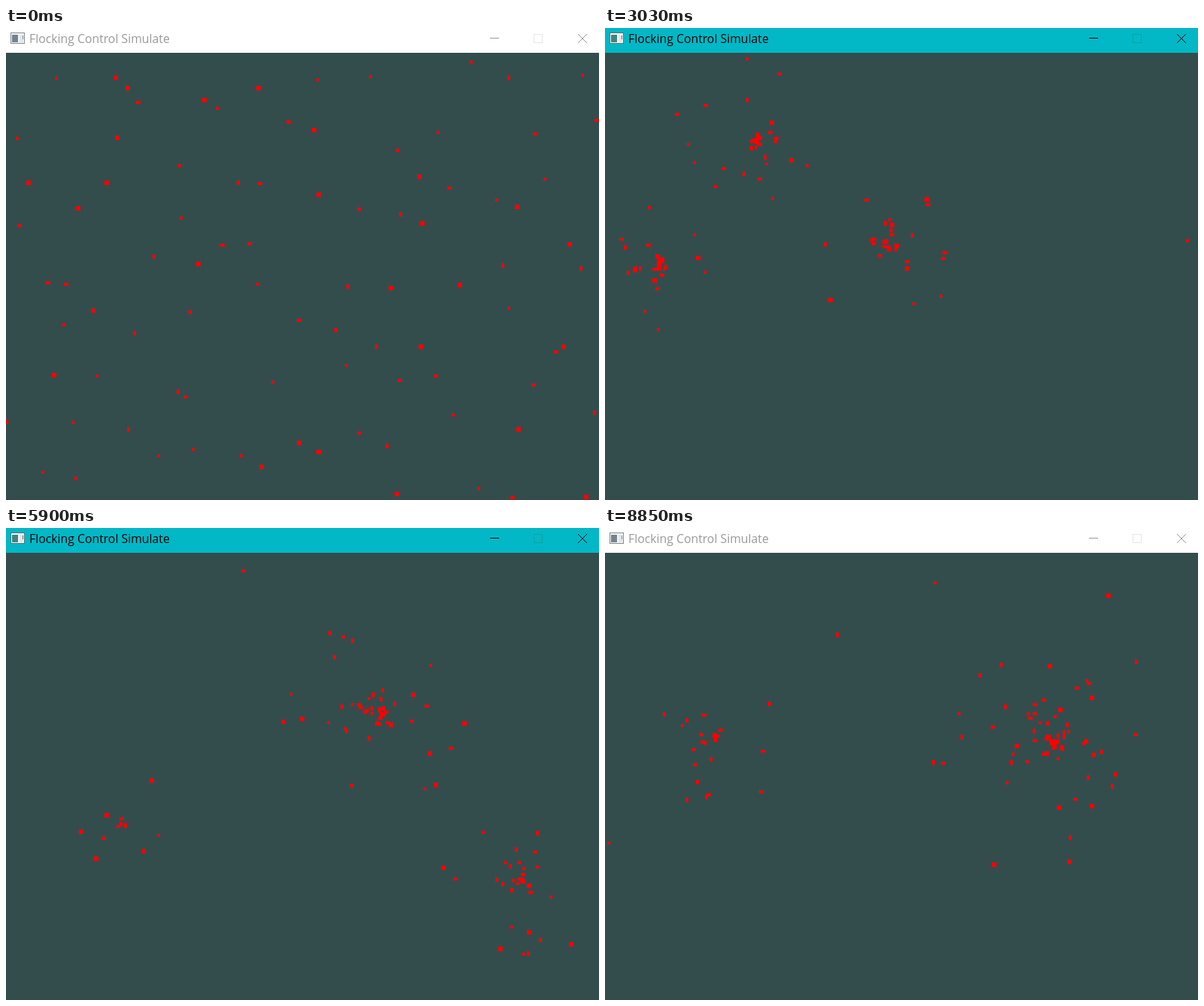
Write an HTML page with a canvas that moves like this. It is 789 px wide and 628 px high and loops after 8.88 s.

```html
<!DOCTYPE html>
<html lang="en">
<head>
<meta charset="utf-8">
<title>Flocking Control Simulate</title>
<style>
  html, body { margin: 0; width: 100%; height: 100%; overflow: hidden; background: #334d4d; }
  canvas, svg { position: absolute; left: 0; top: 0; display: block; }
  svg { --bar: #fff; --ink: #999; --box: #e6e6e6; --pane: #75838f; --edge: #858b91; }
  svg.active { --bar: #02b8c6; --ink: #000; --box: #12a09c; --pane: #3f8580; --edge: #57757a; }
  text { font: 15.8px "Open Sans", "Noto Sans", sans-serif; fill: var(--ink); }
  .line { fill: none; stroke: var(--ink); }
</style>
</head>
<body>
<canvas id="field" width="789" height="628"></canvas>
<svg id="bar" width="789" height="33">
  <rect width="789" height="33" fill="var(--bar)"/>
  <rect x="6.5" y="6.5" width="18" height="14" fill="#f4f6f6" stroke="var(--edge)"/>
  <rect x="8" y="9" width="8" height="10" fill="var(--pane)"/>
  <path d="M18 9h5v10h-5z" fill="#e3e6e6"/>
  <path d="M22.5 10v5" stroke="var(--edge)"/>
  <text x="31" y="20">Flocking Control Simulate</text>
  <path class="line" d="M644 13.5h12"/>
  <rect x="702.5" y="8.5" width="11" height="11" fill="none" stroke="var(--box)"/>
  <path class="line" d="M761 8l12 12m0-12l-12 12"/>
</svg>
<script>
const W = 789, TOP = 33, H = 595, COLS = 10, ROWS = 9;
const LOOP = 8880, STEP = LOOP / 272, FOCUS = [1300, 8600];
const ctx = document.getElementById('field').getContext('2d');
const bar = document.getElementById('bar');

let seed = 41;
function random() {
  seed = (seed + 0x6d2b79f5) | 0;
  let t = Math.imul(seed ^ (seed >>> 15), 1 | seed);
  t = (t + Math.imul(t ^ (t >>> 7), 61 | t)) ^ t;
  return ((t ^ (t >>> 14)) >>> 0) / 4294967296;
}
const mod = (v, n) => ((v % n) + n) % n;
// shortest signed distance on a wrapped axis
const gap = (from, to, size) => mod(to - from + size / 2, size) - size / 2;

// where the flocks are at each moment: x, y, members
const gatherings = [
  { time: 3030, flocks: [[200, 152, 33], [72, 312, 27], [374, 284, 30]] },
  { time: 4590, flocks: [[328, 468, 57], [62, 190, 19], [642, 185, 14]] },
  { time: 5900, flocks: [[500, 252, 45], [685, 470, 33], [150, 395, 12]] },
  { time: 7530, flocks: [[62, 68, 24], [725, 92, 25], [590, 118, 16], [212, 566, 7], [655, 590, 18]] },
  { time: 8850, flocks: [[594, 285, 67], [143, 280, 23]] }
];
const times = [0, 1730, ...gatherings.map(g => g.time)];

// boids start scattered over a loose grid and drift apart
const boids = Array.from({ length: COLS * ROWS }, (_, i) => {
  const x = (i % COLS + random()) * W / COLS;
  const y = TOP + (Math.floor(i / COLS) + random()) * H / ROWS;
  return [[x, y], [x + (random() - .5) * 300, y + (random() - .5) * 300]];
});

// then each joins the nearest flock that still has room; a few stray far out
for (const { flocks } of gatherings) {
  const room = flocks.map(f => f[2]);
  for (const path of boids) {
    const [x, y] = path[path.length - 1];
    const far = i => Math.hypot(gap(x, flocks[i][0], W), gap(y, flocks[i][1], H));
    const pick = [...flocks.keys()].filter(i => room[i]).sort((a, b) => far(a) - far(b))[0];
    room[pick]--;
    const [fx, fy, members] = flocks[pick];
    const reach = (60 + 1.6 * members) * (random() < .03 ? 2.5 : 1);
    const r = reach * random() ** 1.7, a = random() * 2 * Math.PI;
    path.push([x + gap(x, fx, W) + r * Math.cos(a), y + gap(y, fy, H) + r * Math.sin(a)]);
  }
}

// smooth curve through the moments, with even speed at both ends
function along(path, k, u, axis) {
  const at = i => path[i][axis], last = times.length - 1;
  const slope = i => {
    const a = Math.max(i - 1, 0), b = Math.min(i + 1, last);
    return (at(b) - at(a)) / (times[b] - times[a]);
  };
  const span = times[k + 1] - times[k], v = 1 - u;
  return v * v * (1 + 2 * u) * at(k) + u * u * (3 - 2 * u) * at(k + 1)
    + span * u * v * (v * slope(k) - u * slope(k + 1));
}

function draw(now) {
  const t = now % LOOP;
  const shown = Math.min(Math.floor(t / STEP + .35) * STEP, 8850);
  let k = 0;
  while (k < times.length - 2 && shown >= times[k + 1]) k++;
  const u = (shown - times[k]) / (times[k + 1] - times[k]);

  bar.classList.toggle('active', t >= FOCUS[0] && t < FOCUS[1]);
  ctx.fillStyle = '#334d4d';
  ctx.fillRect(0, 0, W, TOP + H);
  ctx.fillStyle = '#f00';
  for (const path of boids) {
    const x = Math.round(mod(along(path, k, u, 0), W));
    const y = Math.round(TOP + mod(along(path, k, u, 1) - TOP, H));
    // edges fall on odd pixels, so a square is 4 or 6 wide and high
    const w = x % 2 ? 4 : 6, h = y % 2 ? 4 : 6;
    ctx.fillRect(x - w / 2, y - h / 2, w, h);
  }
}

const begin = performance.now();
function tick() {
  draw(performance.now() - begin);
  requestAnimationFrame(tick);
}
tick();
</script>
</body>
</html>
```
